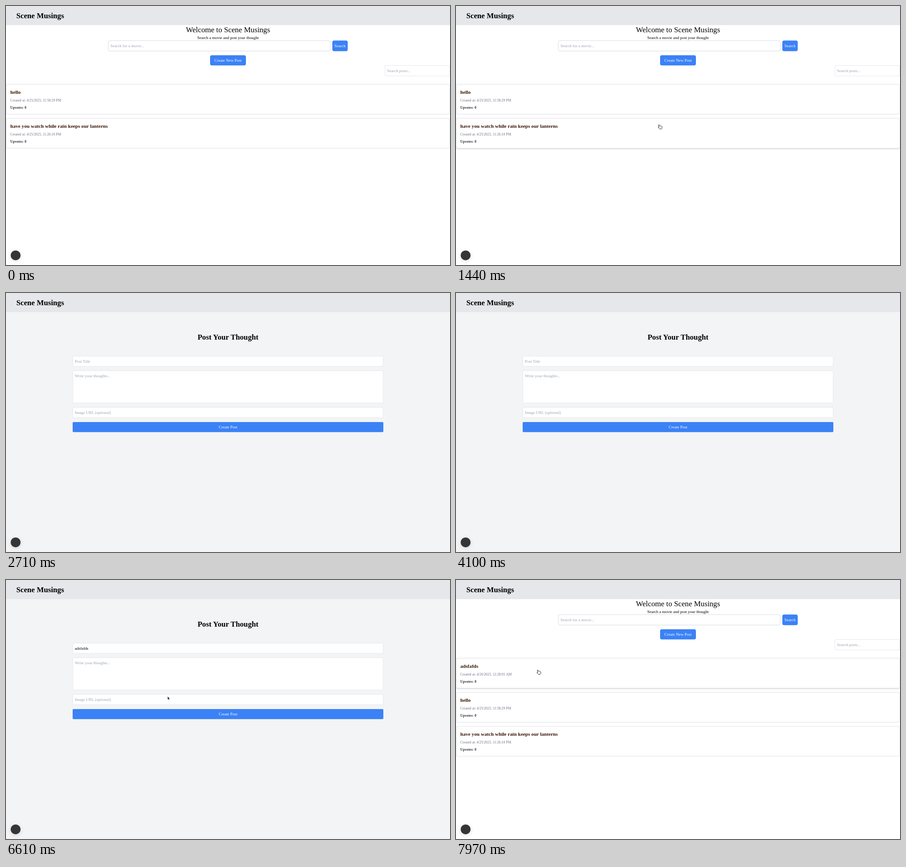
Animation of 979 by 572 pixels, one loop 8000 ms. Source, as an HTML page:

```html
<!DOCTYPE html>
<html lang="en">
<head>
<meta charset="utf-8">
<title>Movie posts</title>
<style>
  html, body { margin: 0; width: 100%; height: 100%; overflow: hidden; background: #fff; }
  svg { display: block; width: 979px; height: 572px; font-family: "Liberation Serif", "Times New Roman", serif; }
  .card { filter: drop-shadow(0 .6px .7px rgba(0, 0, 0, .13)); }
  .card.hover { filter: drop-shadow(0 1.8px 1.6px rgba(0, 0, 0, .2)); }
  .badge { filter: drop-shadow(0 2px 4px rgba(0, 0, 0, .12)); }
</style>
</head>
<body>
<svg id="stage" viewBox="0 0 979 572"></svg>
<script>
const LOOP = 8000;
const SITE = "Scene Musings";
const BLUE = "#3b82f6", BLUE_HOVER = "#3179f3", GRAY = "#9ca3af", LINE = "#e5e7eb", PINK = "#e8709a";
const BIG = 16.7, MID = 8.95, SMALL = 7.8, CARD = 11.15;
const TYPED = "adsfafds";

const stage = document.getElementById("stage");

function add(parent, tag, attrs, content) {
  const el = document.createElementNS("http://www.w3.org/2000/svg", tag);
  for (const key in attrs) el.setAttribute(key, attrs[key]);
  if (content) el.textContent = content;
  parent.append(el);
  return el;
}
const group = (parent, attrs = {}) => add(parent, "g", attrs);
const box = (parent, x, y, width, height, fill, rx = 0, stroke = "none") =>
  add(parent, "rect", { x, y, width, height, fill, rx, stroke });
const label = (parent, x, y, size, fill, content, extra = {}) =>
  add(parent, "text", { x, y, "font-size": size, fill, ...extra }, content);
const MIDDLE = { "text-anchor": "middle" };
const BOLD = { "font-weight": 700 };
const show = (el, on) => el.setAttribute("visibility", on ? "visible" : "hidden");

// Home page
const home = group(stage);
box(home, 0, 0, 979, 572, "#fff");
label(home, 489.5, 58.2, BIG, "#000", "Welcome to " + SITE, MIDDLE);
label(home, 489.5, 72.6, MID, "#000", "Search a movie and post your thought", MIDDLE);
box(home, 225.5, 76.5, 489.5, 23, "#fff", 3.5, "#d9dce1");
label(home, 230.5, 91, MID, GRAY, "Search for a movie...");
box(home, 719.5, 76.3, 34, 23.5, BLUE, 4);
label(home, 736.5, 91, MID, "#fff", "Search", MIDDLE);
const newPost = box(home, 450, 108.8, 79, 22.4, BLUE, 4);
label(home, 489.5, 122.8, MID, "#fff", "Create New Post", MIDDLE);
box(home, 835.5, 131.5, 143, 23, "#fff", 2.5, LINE);
label(home, 840.3, 146, MID, GRAY, "Search posts...");

function makeCard(title, created) {
  const g = group(home);
  const frame = box(g, .5, 173, 978, 65.8, "#fff", 3.5, LINE);
  label(g, 9.5, 193.7, CARD, "#3a1606", title, BOLD);
  label(g, 9.5, 210.8, SMALL, "#6b7280", "Created at: " + created);
  label(g, 9.5, 226.6, SMALL, "#333", "Upvotes: 0", BOLD);
  return { g, frame };
}
const cards = [
  makeCard(TYPED, "4/26/2025, 12:28:01 AM"),
  makeCard("hello", "4/25/2025, 11:58:29 PM"),
  makeCard("have you watch while rain keeps our lanterns", "4/25/2025, 11:26:10 PM")
];

// Form page
const form = group(stage);
box(form, 0, 0, 979, 572, "#f3f4f6");
label(form, 489.5, 103, BIG, "#000", "Post Your Thought", { ...MIDDLE, ...BOLD });
const field = (y, h) => box(form, 147.5, y, 684, h, "#fff", 2, LINE);
const titleField = field(139.5, 22.5);
const bodyField = field(171.7, 71.2);
field(252.5, 23);
const titleText = label(form, 151.8, 153.9, MID, GRAY, "Post Title");
label(form, 151.8, 186.3, MID, GRAY, "Write your thoughts...");
label(form, 151.8, 267.2, MID, GRAY, "Image URL (optional)");
box(form, 147, 285, 685, 22.3, BLUE, 2);
label(form, 489.5, 299, MID, "#fff", "Create Post", MIDDLE);
const caret = box(form, 152, 145.8, 1, 10.6, "#000");

// Header and corner badge
box(stage, 0, 0, 979, 42.3, LINE);
label(stage, 22.7, 26.7, BIG, "#000", SITE, BOLD);
add(stage, "circle", { cx: 21.2, cy: 550.7, r: 10.8, fill: "#353535", class: "badge" });

// Pointers, each with its hot spot at 0,0
const cursor = group(stage);
const pointers = {
  hand: add(cursor, "path", {
    d: "M-.9 .3Q.1-.7 .9.3L2 2.6Q3 1.8 3.7 2.7Q4.8 2.1 5.3 3.1Q6.6 2.9 6.9 4.2L7 6.8Q6.8 8.7 5.3 9.3L2 9.3Q.5 8-1.4 5.9Q-1.8 4.8-.3 4.9L.5 5.2Z",
    fill: "#fff", stroke: "#111", "stroke-width": .9, "stroke-linejoin": "round"
  }),
  arrow: add(cursor, "path", {
    d: "M0 0V7.2L1.6 5.7L2.7 8.2L3.9 7.7L2.8 5.2H5Z",
    fill: "#111", stroke: "#fff", "stroke-width": .5
  }),
  beam: add(cursor, "path", {
    d: "M-1.5-4.5Q0-4.5 0-3.5Q0-4.5 1.5-4.5M0-3.5V3.5M-1.5 4.5Q0 4.5 0 3.5Q0 4.5 1.5 4.5",
    fill: "none", stroke: "#333", "stroke-width": .8
  })
};

// time, x, y, pointer until the next step
const track = [
  [0, 0, 0, ""],
  [620, 420, 420, "arrow"],
  [860, 436, 315, "arrow"],
  [900, 438, 305, "hand"],
  [1090, 441.7, 282.2, "hand"],
  [1350, 441.7, 282.2, "hand"],
  [1680, 462, 210, "hand"],
  [1860, 482, 150, "arrow"],
  [1950, 488, 130, "hand"],
  [2030, 488.5, 125, "hand"],
  [2330, 0, 0, ""],
  [4130, 350, 210, "arrow"],
  [4330, 315, 160, "beam"],
  [4790, 0, 0, ""],
  [5220, 325, 180, "beam"],
  [5320, 380, 208, "beam"],
  [5590, 380, 208, "beam"],
  [5690, 474, 285, "hand"],
  [5720, 476, 288.3, "hand"],
  [6310, 476, 288.3, "arrow"],
  [6610, 356.5, 257, "arrow"],
  [7060, 284, 243, "arrow"],
  [7160, 272, 239, "arrow"],
  [7340, 272, 239, "arrow"],
  [7430, 252, 229, "hand"],
  [7800, 185, 202, "hand"],
  [7950, 180, 199, "hand"],
  [LOOP, 180, 199, ""]
];

function pointerAt(t) {
  const i = track.findIndex((step, n) => n + 1 === track.length || t < track[n + 1][0]);
  const [t0, x0, y0, kind] = track[i];
  const next = track[i + 1];
  if (!next || !next[1]) return { x: x0, y: y0, kind };
  const k = (t - t0) / (next[0] - t0);
  return { x: x0 + (next[1] - x0) * k, y: y0 + (next[2] - y0) * k, kind };
}

function draw(t) {
  const onForm = t >= 2330 && t < 6800;
  const posted = t >= 6800;
  show(form, onForm);

  const p = pointerAt(t);
  cursor.setAttribute("transform", `translate(${p.x} ${p.y})`);
  for (const name in pointers) show(pointers[name], name === p.kind);

  cards.forEach(({ g, frame }, i) => {
    const slot = posted ? i : i - 1;
    const top = 173 + slot * 75.2;
    g.setAttribute("transform", `translate(0 ${slot * 75.2})`);
    show(g, !onForm && slot >= 0 && (!posted || t >= 7390));
    frame.setAttribute("class", p.kind && p.y > top && p.y < top + 66 ? "card hover" : "card");
  });
  newPost.setAttribute("fill", !posted && p.kind === "hand" && p.y < 131 ? BLUE_HOVER : BLUE);

  const inTitle = t >= 4450 && t < 5290;
  const inBody = t >= 5290 && t < 6020;
  titleField.setAttribute("stroke", inTitle ? PINK : LINE);
  bodyField.setAttribute("stroke", inBody ? PINK : LINE);

  const count = Math.max(0, Math.min(TYPED.length, Math.floor((t - 4790) / 52) + 1));
  titleText.textContent = count ? TYPED.slice(0, count) : "Post Title";
  titleText.setAttribute("fill", count ? "#000" : GRAY);
  show(caret, onForm && (inTitle || inBody));
  caret.setAttribute("x", inTitle && count ? 152 + titleText.getComputedTextLength() : 152);
  caret.setAttribute("y", inBody ? 178.2 : 145.8);
}

const start = performance.now();
function tick() {
  draw((performance.now() - start) % LOOP);
  requestAnimationFrame(tick);
}
tick();
</script>
</body>
</html>
```
